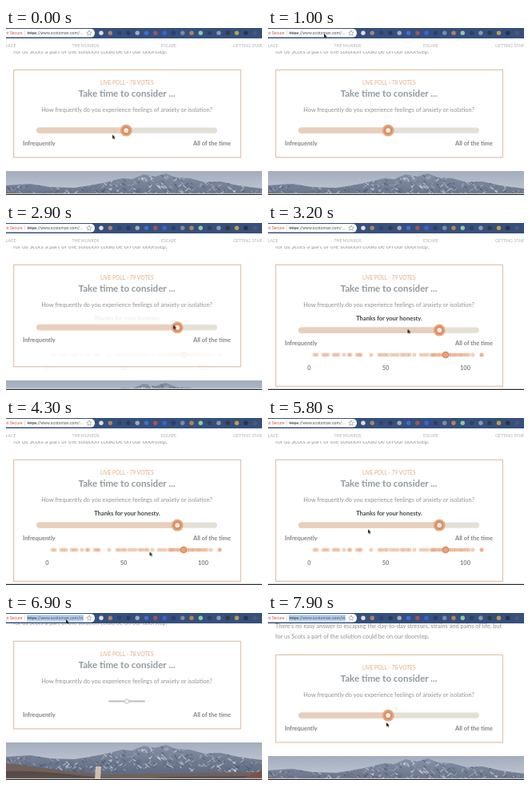
Recreate the animation shown at these times as an HTML page. Size 320 px wide and 209 px high, loop 8000 ms.

```html
<!DOCTYPE html>
<html lang="en">
<head>
<meta charset="utf-8">
<title>Live poll</title>
<style>
html, body { margin: 0; width: 100%; height: 100%; overflow: hidden; background: #fff; }
svg { display: block; width: 100%; height: 100%; }
text { font-family: Lato, "Open Sans", sans-serif; font-size: 7.4px; fill: #929292; }
.mid { text-anchor: middle; }
.bold { font-weight: 700; }
.label { font-size: 7.45px; fill: #838383; }
.nav text { font-size: 5.2px; fill: #b0b0b0; }
.url text { font-family: Roboto, "Liberation Sans", sans-serif; font-size: 5.15px; fill: #555; }
.url .warn { fill: #cf5b50; }
.live { font-size: 6.6px; fill: #e2ab85; }
.title { font-size: 11.6px; fill: #929a9f; }

/* one loop is 8 s, so 1% is 80 ms */
.page, .card, .lower, .photo, .knob, .fill, .fade, .cursor { animation: 8s linear infinite; }
.nav, .plain, .picked, .before, .after, .styled, .native, .arrow, .beam { animation: 8s step-end infinite; }
.page { animation-name: page; }
.nav { animation-name: nav; }
.card { animation-name: card; }
.lower { animation-name: lower; }
.photo { animation-name: photo; }
.knob { animation-name: knob; }
.fill { animation-name: fill; }
.fade { animation-name: fade; }
.cursor { animation-name: cursor; }
.plain { animation-name: plain; }
.picked { animation-name: picked; }
.before { animation-name: before; }
.after { animation-name: after; }
.styled { animation-name: styled; }
.native { animation-name: native; }
.arrow { animation-name: arrow; }
.beam { animation-name: beam; }

@keyframes page {
  0%, 83.74% { transform: translateY(0); }
  83.75%, 91% { transform: translateY(-17px); animation-timing-function: ease-in-out; }
  94%, 100% { transform: translateY(0); }
}
@keyframes nav { 0% { opacity: 1; } 83.75%, 100% { opacity: 0; } }
@keyframes card {
  0%, 35% { height: 109.5px; }
  38%, 83.74% { height: 152px; }
  83.75%, 100% { height: 109.5px; }
}
@keyframes lower {
  0%, 35% { transform: translateY(0); }
  38%, 83.74% { transform: translateY(6px); }
  83.75%, 100% { transform: translateY(0); }
}
@keyframes photo {
  0%, 35% { transform: translateY(0); }
  38%, 83.74% { transform: translateY(43px); }
  83.75%, 100% { transform: translateY(0); }
}
@keyframes knob {
  0%, 30% { transform: translateX(150px); animation-timing-function: ease-in-out; }
  34%, 83.74% { transform: translateX(214px); }
  83.75%, 100% { transform: translateX(150px); }
}
@keyframes fill {
  0%, 30% { width: 112px; animation-timing-function: ease-in-out; }
  34%, 83.74% { width: 176px; }
  83.75%, 100% { width: 112px; }
}
@keyframes fade {
  0%, 36% { opacity: 0; }
  39%, 83.74% { opacity: 1; }
  83.75%, 100% { opacity: 0; }
}
@keyframes plain { 0% { opacity: 1; } 13.75% { opacity: 0; } 29.5% { opacity: 1; } 80.5%, 100% { opacity: 0; } }
@keyframes picked { 0% { opacity: 0; } 13.75% { opacity: 1; } 29.5% { opacity: 0; } 80.5%, 100% { opacity: 1; } }
@keyframes before { 0% { opacity: 1; } 35.5% { opacity: 0; } 83.75%, 100% { opacity: 1; } }
@keyframes after { 0% { opacity: 0; } 35.5% { opacity: 1; } 83.75%, 100% { opacity: 0; } }
@keyframes styled { 0% { opacity: 1; } 83.75% { opacity: 0; } 89%, 100% { opacity: 1; } }
@keyframes native { 0% { opacity: 0; } 83.75% { opacity: 1; } 89%, 100% { opacity: 0; } }
@keyframes arrow { 0% { opacity: 1; } 24.5% { opacity: 0; } 27.5%, 100% { opacity: 1; } }
@keyframes beam { 0% { opacity: 0; } 24.5% { opacity: 1; } 27.5%, 100% { opacity: 0; } }
@keyframes cursor {
  0%, 3.75% { transform: translate(133px, 133.5px); animation-timing-function: ease-in-out; }
  11.25%, 17.5% { transform: translate(70px, 7px); animation-timing-function: ease-in-out; }
  25%, 26.5% { transform: translate(176px, 115px); }
  29.5%, 30% { transform: translate(150px, 127px); animation-timing-function: ease-in-out; }
  34%, 36% { transform: translate(214px, 127px); animation-timing-function: ease-out; }
  39.5%, 46% { transform: translate(174.5px, 132.8px); animation-timing-function: ease-in-out; }
  53% { transform: translate(182.5px, 168px); }
  57.5%, 62.4% { transform: translate(165px, 164px); }
  65%, 68.7% { transform: translate(121px, 142px); }
  72%, 74% { transform: translate(125px, 139.3px); animation-timing-function: ease-in-out; }
  80%, 89% { transform: translate(75px, 8px); animation-timing-function: ease-in-out; }
  97%, 100% { transform: translate(148px, 137px); }
}
</style>
</head>
<body>
<svg viewBox="0 0 320 209" preserveAspectRatio="none">
  <defs>
    <linearGradient id="sky" x2="0" y2="1">
      <stop offset="0" stop-color="#a3adbe"/>
      <stop offset=".5" stop-color="#c3c9d4"/>
    </linearGradient>
    <linearGradient id="rock" x2="0" y2="1">
      <stop offset="0" stop-color="#8590a6"/>
      <stop offset=".6" stop-color="#616c82"/>
    </linearGradient>
    <path id="ridge" d="M0 18L30 16 55 20 85 21 105 18 125 14 145 9 158 10 172 4 186 7 200 3 212 8 230 9 248 14 268 13 290 18 320 22V60H0Z"/>
    <clipPath id="slope"><use href="#ridge"/></clipPath>
  </defs>
  <rect width="320" height="209" fill="#fff"/>

  <g class="page">
    <text x="9" y="18.5">There's no easy answer to escaping the day-to-day stresses, strains and pains of life, but</text>
    <text x="9" y="31.5">for us Scots a part of the solution could be on our doorstep.</text>

    <g class="photo">
      <g transform="translate(0 179)">
        <rect width="320" height="60" fill="url(#sky)"/>
        <use href="#ridge" fill="url(#rock)"/>
        <g id="snow" clip-path="url(#slope)" fill="none" stroke-linecap="round"/>
        <path d="M0 26L40 31 85 37 130 40 210 39 320 37V60H0Z" fill="#71605a"/>
        <path d="M0 36Q40 35 90 41T200 43L320 42V60H0Z" fill="#574a47"/>
        <path d="M112 30h7l-1 16h-7z" fill="#d0bfae"/>
        <path d="M294 46L320 35V60H294Z" fill="#7b5148"/>
      </g>
    </g>

    <rect class="card" x="9.6" y="52.4" width="283.8" height="109.5" fill="#fff" stroke="#e2c6b0" stroke-width="1.3"/>
    <text class="live mid before" x="151.2" y="71.4">LIVE POLL - 78 VOTES</text>
    <text class="live mid after" x="151.2" y="71.4">LIVE POLL - 79 VOTES</text>
    <text class="title mid bold" x="151" y="86">Take time to consider ...</text>
    <text class="mid" x="151" y="104.7">How frequently do you experience feelings of anxiety or isolation?</text>

    <g class="lower">
      <g class="styled">
        <rect x="38" y="124.4" width="226" height="7.4" rx="3.7" fill="#e4e0d5"/>
        <rect class="fill" x="38" y="124.4" width="112" height="7.4" rx="3.7" fill="#e9cebc"/>
        <g class="knob">
          <circle cx=".2" cy="128.2" r="7.4" fill="#e3a783"/>
          <circle cx=".2" cy="128.2" r="5.4" fill="#dc8d5f"/>
          <circle cx=".2" cy="128.2" r="2.9" fill="#f8ebe3"/>
        </g>
      </g>
      <g class="native">
        <rect x="128" y="126.5" width="46" height="2" rx="1" fill="#bdbdbd"/>
        <circle cx="151" cy="127.5" r="2.8" fill="#f2f2f2" stroke="#b4b4b4" stroke-width=".7"/>
      </g>
      <text class="label bold" x="21" y="146.6">Infrequently</text>
      <text class="label bold" x="281" y="146.6" text-anchor="end">All of the time</text>
    </g>

    <g class="fade">
      <text class="mid bold" x="151.5" y="122.3" style="font-size:7.55px;fill:#444">Thanks for your honesty.</text>
      <g id="votes" fill="#e0905f" fill-opacity=".42"/>
      <circle cx="222" cy="165" r="3.7" fill="#e6a47b" stroke="#dc8450" stroke-width="1.3"/>
      <g class="mid bold">
        <text class="label" x="51.5" y="183.7">0</text>
        <text class="label" x="147" y="183.7">50</text>
        <text class="label" x="246.5" y="183.7">100</text>
      </g>
    </g>
  </g>

  <g class="nav">
    <rect y="13" width="320" height="16" fill="#fff"/>
    <text x="12.5" y="24" text-anchor="end">PLACE</text>
    <text x="82.5" y="24">THE MUNROS</text>
    <text x="194" y="24">ESCAPE</text>
    <text x="284" y="24">GETTING STARTED</text>
  </g>

  <g class="url">
    <rect width="320" height="13" fill="#35507c"/>
    <rect x="-8" y="1" width="119" height="10.6" rx="5" fill="#fff"/>
    <text class="warn" x="20.5" y="8.2" text-anchor="end">Not Secure</text>
    <path d="M23.5 3v6.5" stroke="#ccc" stroke-width=".6"/>
    <text class="plain" x="26.5" y="8.2"><tspan text-decoration="line-through">https</tspan>://www.scotsman.com/...</text>
    <g class="picked">
      <rect x="26" y="2.2" width="71" height="8" fill="#b1cff5"/>
      <text x="26.5" y="8.2"><tspan text-decoration="line-through">https</tspan>://www.scotsman.com/in</text>
    </g>
    <path d="M104 3l.9 2.2 2.4.2-1.8 1.5.6 2.4-2.1-1.3-2.1 1.3.6-2.4-1.8-1.5 2.4-.2Z" fill="none" stroke="#888" stroke-width=".6"/>
    <g id="tools"/>
  </g>
  <rect y="206.8" width="320" height="1.1" fill="#e6e6e6"/>
  <rect y="207.9" width="320" height="1.1" fill="#24272d"/>

  <g class="cursor">
    <path class="arrow" d="M0 0V5.2L1.2 4.1 2.1 5.9 3 5.5 2.2 3.8H3.8Z" fill="#222"/>
    <path class="beam" d="M-1.2 -2.5Q0 -2.5 0 -1.7V2.4Q0 3.2 -1.2 3.2M1.2 -2.5Q0 -2.5 0 -1.7M0 2.4Q0 3.2 1.2 3.2" fill="none" stroke="#777" stroke-width=".7"/>
  </g>
</svg>
<script>
const add = (id, tag, attrs) => {
  const el = document.createElementNS('http://www.w3.org/2000/svg', tag);
  for (const key in attrs) el.setAttribute(key, attrs[key]);
  document.getElementById(id).append(el);
};

const votes = [58, 61, 69, 72, 75, 82, 85, 88, 95, 101, 103, 111, 114, 116, 129, 139, 142,
  146, 149, 154, 158, 162, 167, 170, 174, 177, 183, 191, 195, 199, 204, 206, 208, 210, 213,
  215, 218, 220, 224, 227, 229, 232, 234, 237, 240, 242, 245, 248, 251, 256, 267, 267];
votes.forEach(x => add('votes', 'circle', { cx: x, cy: 165, r: 2.5 }));

const tools = ['#dedfe0', '#a98468', '#2d4370', '#2b3c60', '#a3acbb', '#3f6fd0', '#a4525f', '#3b63d8', '#2a3f6a',
  '#7f8ca3', '#b58450', '#8ccca4', '#2c4068', '#8e98a8', '#353a44', '#bd9c4c', '#2b3344', '#4a5b78'];
tools.forEach((fill, i) => add('tools', 'circle', { cx: 119 + i * 11.3, cy: 6.3, r: 2.7, fill }));

// short strokes down both flanks: pale snow and dark rock
let seed = 7;
const rand = () => (seed = seed * 16807 % 2147483647) / 2147483647;
for (let i = 0; i < 420; i++) {
  const x = rand() * 320;
  const y = 4 + Math.abs(x - 195) * .08 + rand() * 26;
  const len = 1 + rand() * 3;
  const dir = rand() < .4 ? -1 : 1;
  const snowy = rand() < (x > 100 ? .65 : .4);
  add('snow', 'path', {
    d: `M${x} ${y}l${dir * len} ${len * .8}`,
    stroke: snowy ? '#dfe4ec' : '#465068',
    'stroke-width': .6 + rand() * 1.2,
    'stroke-opacity': .25 + rand() * .4
  });
}
</script>
</body>
</html>
```
